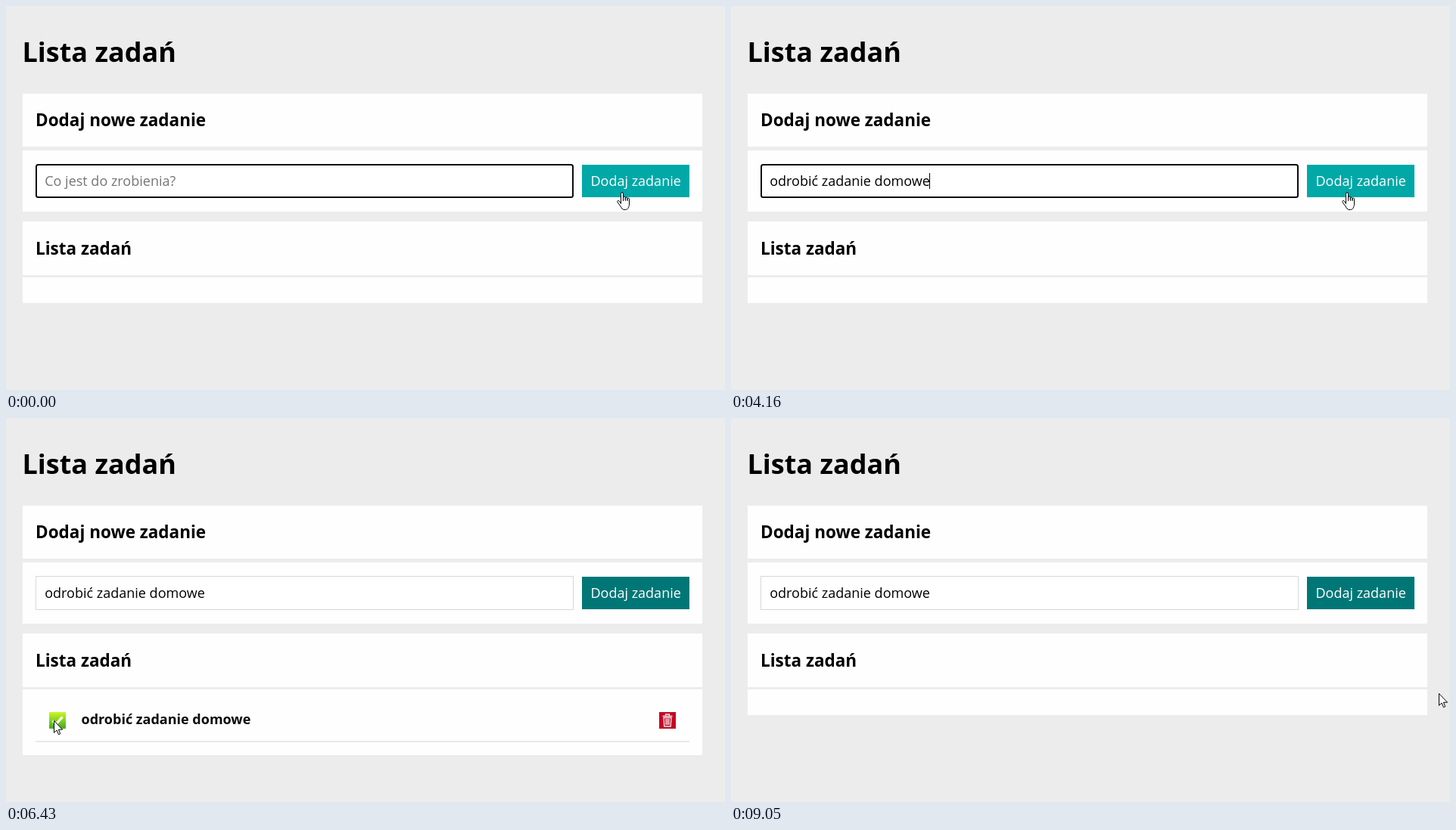
Animation, 950 px wide and 508 px high, one loop 9.18 s. Source, as an HTML page:

```html
<!DOCTYPE html>
<html lang="pl">
<head>
<meta charset="utf-8">
<title>Lista zadań</title>
<style>
html, body { margin: 0; width: 100%; height: 100%; overflow: hidden; background: #ececec; }
svg { display: block; font: 18px "Open Sans", sans-serif; }
.bold { font-weight: 700; }
.h1 { font-size: 36px; }
.h2 { font-size: 22.5px; }
.panel { fill: #fefefe; }
.pointer { fill: #fff; stroke: #000; stroke-linejoin: round; }
</style>
</head>
<body>
<svg width="950" height="508" viewBox="0 0 950 508">
  <defs>
    <linearGradient id="green" x2="0" y2="1">
      <stop stop-color="#b4de20"/>
      <stop offset="1" stop-color="#3b971d"/>
    </linearGradient>
  </defs>
  <rect width="950" height="508" fill="#ececec"/>
  <text class="bold h1" x="21.5" y="74">Lista zadań</text>

  <rect class="panel" x="22" y="116" width="898" height="70"/>
  <rect class="panel" x="22" y="191" width="898" height="81"/>
  <rect class="panel" x="22" y="285" width="898" height="71"/>
  <rect class="panel" id="list" x="22" y="359" width="898" height="34"/>
  <text class="bold h2" x="39" y="159">Dodaj nowe zadanie</text>
  <text class="bold h2" x="39" y="329">Lista zadań</text>

  <rect id="focused" x="40" y="210" width="709" height="43" rx="2.5" fill="#fff" stroke="#0c0c0c" stroke-width="2"/>
  <rect id="blurred" x="39.5" y="209.5" width="710" height="44" fill="#fff" stroke="#d8d8d8"/>
  <text id="hint" x="51.2" y="238" fill="#757575">Co jest do zrobienia?</text>
  <text id="typed" x="51.2" y="238"></text>
  <rect id="caret" y="221" width="1" height="21"/>

  <rect id="button" x="761" y="210" width="142" height="43"/>
  <text x="772.4" y="238" fill="#fff">Dodaj zadanie</text>

  <g id="task">
    <g id="check" transform="translate(57 389)">
      <rect width="22" height="22" rx="1" fill="url(#green)"/>
      <path d="M4.5 11.5L9 16L17.5 6.5" fill="none" stroke="#fff" stroke-width="3"/>
    </g>
    <text class="bold" x="99.5" y="405" fill="#0a0a0a">odrobić zadanie domowe</text>
    <g transform="translate(863 389)">
      <rect width="22" height="22" fill="#c30a24"/>
      <path d="M4.5 5.5H17.5M8.5 5V3H13.5V5M6 7.5L6.8 19H15.2L16 7.5ZM9 9V17M11 9V17M13 9V17" fill="none" stroke="#f4e4e6" stroke-width="1.3"/>
    </g>
    <rect x="39" y="427" width="864" height="2" fill="#e9e9e9"/>
  </g>

  <g id="hand" class="pointer">
    <path d="M-.5 15.5V2.2a1.5 1.5 0 0 1 3 0V9V7.5a1.4 1.4 0 0 1 2.8 0V10V8.3a1.4 1.4 0 0 1 2.7 0V10.5V9.3a1.2 1.2 0 0 1 2.5 0V16c0 3-1.5 7.5-5 7.5H4c-2.5 0-4-2.5-5-4.5L-5 13.5c-.8-1.5 1-2.8 2.2-1.6Z"/>
    <path d="M2.5 8V12M5.3 9V12M8 10V12"/>
  </g>
  <path id="arrow" class="pointer" d="M.5.5V16.3L4.1 13L6.5 18.7L8.8 17.7L6.4 12.2H11.6Z"/>
  <path id="beam" fill="none" stroke="#000" d="M-3 -7.5H-1L0 -6.5L1 -7.5H3M0 -6.5V6.5M-3 7.5H-1L0 6.5L1 7.5H3"/>
</svg>
<script>
const LOOP = 9180, ADD = 4850, LEAVE = 5780, BLUR = 6400, REMOVE = 8630, BLINK = 530;
const $ = id => document.getElementById(id);
const show = (id, on) => $(id).style.display = on ? "" : "none";

// each burst: start, ms per key, text
const bursts = [[1030, 100, "odrobić"], [2220, 100, " zadanie"], [3190, 90, " domowe"]];
const keys = bursts.flatMap(([start, step, text]) =>
  [...text].map((char, i) => ({ char, at: start + i * step })));

// time, x, y of the pointer
const route = [
  [0, 813, 246], [5700, 813, 246], [5800, 770, 262], [5950, 570, 318], [6150, 230, 382],
  [6350, 63, 400], [6780, 63, 400], [7100, 110, 401], [7320, 195, 401], [7670, 520, 404],
  [8000, 800, 404], [8200, 867, 404], [8650, 867, 404], [8850, 912, 382], [9040, 935, 364],
  [LOOP, 935, 364]
];

function pointerAt(t) {
  const i = route.findIndex(stop => stop[0] > t);
  const [t0, x0, y0] = route[i - 1], [t1, x1, y1] = route[i];
  const p = (t - t0) / (t1 - t0);
  return [x0 + (x1 - x0) * p, y0 + (y1 - y0) * p];
}

function draw(t) {
  const pressed = keys.filter(key => key.at <= t);
  const text = pressed.map(key => key.char).join("");
  $("typed").textContent = text;
  show("hint", !text);

  const focus = t < BLUR;
  show("focused", focus);
  show("blurred", !focus);
  const since = t >= ADD ? t - ADD : text ? t - pressed.at(-1).at : t + BLINK;
  show("caret", focus && Math.floor(since / BLINK) % 2 === 0);
  $("caret").setAttribute("x", Math.floor(51.2 + (text ? $("typed").getComputedTextLength() : 0)));

  const fade = Math.min(1, Math.max(0, (t - LEAVE) / 200));
  const tone = Math.round(168 - 49 * fade);
  $("button").setAttribute("fill", `rgb(0 ${tone} ${tone})`);

  const listed = t >= ADD && t < REMOVE;
  show("task", listed);
  $("list").setAttribute("height", listed ? 87 : 34);
  $("check").style.filter = t >= BLUR && t < BLUR + 160 ? "brightness(1.12)" : "none";

  const [x, y] = pointerAt(t);
  const shape = y < 253 ? "hand" : listed && x > 100 && x < 324 && y > 386 ? "beam" : "arrow";
  for (const id of ["hand", "arrow", "beam"]) show(id, id === shape);
  const snap = shape === "beam" ? 0.5 : 0;
  $(shape).setAttribute("transform", `translate(${Math.round(x) - snap} ${Math.round(y)})`);
}

const begin = performance.now();
function tick() {
  draw((performance.now() - begin) % LOOP);
  requestAnimationFrame(tick);
}
tick();
</script>
</body>
</html>
```
